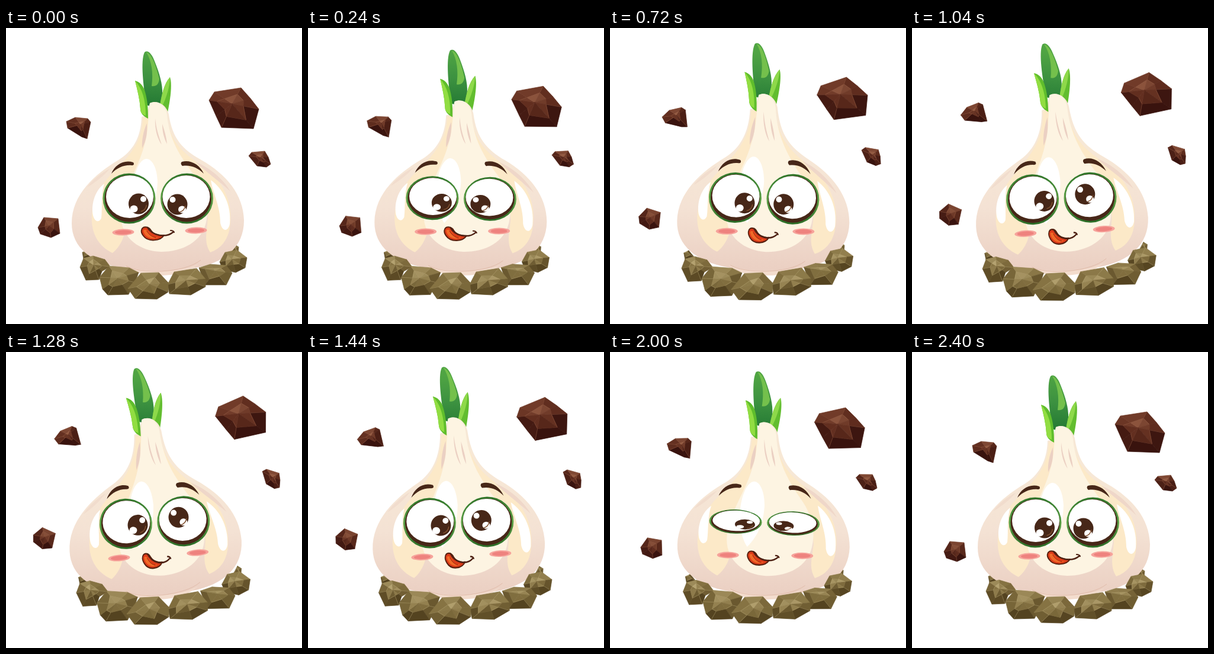
These frames come from a looping animation (500 by 500 pixels, 2480 ms). An HTML page with a canvas:

```html
<!DOCTYPE html>
<html lang="en">
<head>
<meta charset="utf-8">
<title>Garlic</title>
<style>
  html, body { margin: 0; width: 100%; height: 100%; overflow: hidden; background: #fff; }
  canvas { display: block; width: 500px; height: 500px; }
</style>
</head>
<body>
<canvas id="stage" width="500" height="500"></canvas>
<script>
const ctx = document.getElementById('stage').getContext('2d');
const STEP = 80, STEPS = 31, HALF = 15;
const BROWN = '#472718', PINK = '#ebd0c3';
const PIVOT = [257, 412];
const EARTH = [[84, 67, 32], [132, 113, 65], [180, 162, 112]];
const CLAY = [[57, 19, 14], [98, 46, 31], [148, 91, 66]];

const clamp = v => Math.max(0, Math.min(1, v));
const ease = (u, a, b) => (1 - Math.cos(Math.PI * clamp((u - a) / (b - a)))) / 2;
const rad = deg => deg * Math.PI / 180;

let pose;

function poseAt(u) {
  return {
    drift: ease(u, 0, HALF),
    angle: rad(2.35 * ease(u, 0, 7) - 5.15 * ease(u, 7, 15)),
    rise: 15 * ease(u, 0, 11) - 1.5 * ease(u, 11, 15),
    lid: 1 - 0.52 * (ease(u, 2, 5) - ease(u, 5, 8)),
    gaze: ease(u, 8, 14)
  };
}

// Stretch the neck upwards, then tilt about the root.
function bend(x, y) {
  const w = clamp((300 - y) / 160) ** 2;
  const dx = x - PIVOT[0], dy = y - pose.rise * w - PIVOT[1];
  const c = Math.cos(pose.angle), s = Math.sin(pose.angle);
  return [PIVOT[0] + dx * c - dy * s, PIVOT[1] + dx * s + dy * c];
}

function trace(d, map) {
  ctx.beginPath();
  for (const [, cmd, rest] of d.matchAll(/([MLCZ])([^MLCZ]*)/g)) {
    const n = (rest.match(/-?[\d.]+/g) || []).map(Number);
    const p = [];
    for (let i = 0; i < n.length; i += 2) p.push(...(map ? map(n[i], n[i + 1]) : [n[i], n[i + 1]]));
    if (cmd === 'M') ctx.moveTo(...p);
    else if (cmd === 'Z') ctx.closePath();
    else if (cmd === 'L') ctx.lineTo(...p);
    else for (let i = 0; i < p.length; i += 6) ctx.bezierCurveTo(...p.slice(i, i + 6));
  }
}

function shape(d, fill, map = bend) {
  trace(d, map);
  ctx.fillStyle = fill;
  ctx.fill();
}

function line(d, color, width, map = bend) {
  trace(d, map);
  ctx.strokeStyle = color;
  ctx.lineWidth = width;
  ctx.stroke();
}

function oval(x, y, rx, ry, fill) {
  ctx.beginPath();
  ctx.ellipse(x, y, rx, ry, 0, 0, 7);
  ctx.fillStyle = fill;
  ctx.fill();
}

function fade(y0, y1, ...colors) {
  const g = ctx.createLinearGradient(0, y0, 0, y1);
  colors.forEach((c, i) => g.addColorStop(i / (colors.length - 1), c));
  return g;
}

// Draw in a frame fixed to a point of the face.
function pinned(x, y, sx, sy, draw) {
  ctx.save();
  ctx.translate(...bend(x, y));
  ctx.rotate(pose.angle);
  ctx.scale(sx, sy);
  draw();
  ctx.restore();
}

function tone(pal, v) {
  const k = clamp(v) * 2, i = k < 1 ? 0 : 1;
  return `rgb(${pal[i].map((c, j) => Math.round(c + (pal[i + 1][j] - c) * (k - i)))})`;
}

// A faceted stone: a light front face ringed by facets shaded by direction.
function rock(pts, [cx, cy], pal, size, spin) {
  const inner = pts.map(([x, y], i) => {
    const k = size + 0.13 * Math.sin(i * 2.3 + spin);
    return [cx + (x - cx) * k, cy + (y - cy) * k];
  });
  const face = (list, v) => {
    ctx.beginPath();
    list.forEach(p => ctx.lineTo(...p));
    ctx.closePath();
    ctx.fillStyle = ctx.strokeStyle = tone(pal, v);
    ctx.lineWidth = 0.7;
    ctx.fill();
    ctx.stroke();
  };
  pts.forEach((p, i) => {
    const j = (i + 1) % pts.length, q = pts[j];
    const a = Math.atan2((p[1] + q[1]) / 2 - cy, (p[0] + q[0]) / 2 - cx);
    face([p, q, inner[j], inner[i]], 0.34 - 0.36 * Math.sin(a) + 0.13 * Math.sin(i * 4 + spin));
    face([inner[i], inner[j], [cx, cy]], 0.64 - 0.24 * Math.sin(a) + 0.16 * Math.cos(i * 3 + spin));
  });
  ctx.strokeStyle = tone(pal, 1);
  ctx.globalAlpha = 0.55;
  ctx.lineWidth = 0.8;
  ctx.beginPath();
  inner.forEach((p, i) => {
    if (i % 2) return;
    ctx.moveTo(...pts[i]);
    ctx.lineTo(...p);
    ctx.lineTo(...inner[(i + 1) % inner.length]);
  });
  ctx.stroke();
  ctx.globalAlpha = 1;
}

const floaters = [
  { c: [385, 136], move: [13, -25, -15], heart: [382, 128], size: 0.55,
    pts: [[343, 122], [352, 108], [397, 101], [413, 119], [427, 137], [418, 170], [364, 168], [355, 149]] },
  { c: [122, 168], move: [-18, -22, -28], heart: [126, 163], size: 0.4,
    pts: [[102, 158], [117, 151], [138, 153], [143, 159], [137, 187], [128, 184], [104, 169]] },
  { c: [429, 221], move: [20, -7.5, 23], heart: [430, 219], size: 0.45,
    pts: [[410, 216], [415, 210], [437, 208], [443, 218], [447, 230], [440, 235], [424, 233]] },
  { c: [72, 336], move: [-8.5, -22, 20], heart: [73, 334], size: 0.5,
    pts: [[54, 337], [64, 320], [88, 322], [91, 347], [76, 354], [58, 348]] }
];

const backStones = [
  [[378, 382], [387, 366], [393, 370], [392, 382]],
  [[129, 379], [137, 375], [146, 386], [131, 390]]
];

const frontStones = [
  [[361, 395], [370, 379], [390, 375], [407, 388], [404, 405], [388, 413], [366, 408]],
  [[326, 405], [345, 399], [372, 401], [382, 414], [372, 434], [336, 434]],
  [[125, 404], [131, 389], [147, 385], [167, 391], [176, 403], [162, 411], [157, 425], [135, 426]],
  [[158, 421], [174, 402], [208, 405], [224, 413], [218, 430], [207, 450], [172, 451], [163, 441]],
  [[273, 433], [284, 412], [322, 406], [337, 424], [337, 437], [312, 451], [276, 449]],
  [[206, 440], [228, 414], [258, 413], [274, 430], [274, 446], [255, 458], [218, 457]]
];

function floating() {
  floaters.forEach((f, i) => {
    const [dx, dy, turn] = f.move.map(v => v * pose.drift);
    ctx.save();
    ctx.translate(f.c[0] + dx, f.c[1] + dy);
    ctx.rotate(rad(turn));
    ctx.translate(-f.c[0], -f.c[1]);
    rock(f.pts, f.heart, CLAY, f.size, i + 2);
    ctx.restore();
  });
}

function ring(stones) {
  const k = 1 + 0.043 * pose.drift;
  ctx.save();
  ctx.translate(266, 410);
  ctx.rotate(rad(-1.2 * pose.drift));
  ctx.scale(k, k);
  ctx.translate(-266, -410);
  stones.forEach((pts, i) => {
    const mid = j => pts.reduce((s, p) => s + p[j], 0) / pts.length;
    rock(pts, [mid(0) - 2, mid(1) - 4], EARTH, 0.5, i * 1.7);
  });
  ctx.restore();
}

function leaves() {
  shape('M237 130 C232 98 227 55 234 41 C240 36 247 45 251 56 C259 76 265 95 264 112 L262 138 Z',
    fade(40, 130, '#4fa443', '#3c9140', '#257a34'));
  shape('M237 41 C246 55 249 76 246 98 C253 99 258 96 259 86 C254 65 246 43 237 41 Z', '#74c04c');
  shape('M277 83 C281 95 278 120 272 147 C266 140 262 135 260 130 C263 113 267 94 277 83 Z', '#62bd2f');
  shape('M277 83 C277 98 271 118 263 134 L260 130 C263 113 267 94 277 83 Z', '#8ed94a');
}

function bulb() {
  shape('M229 150 C228 185 214 208 190 223 C150 247 111 281 111 330 C111 371 145 398 200 406 ' +
    'C235 413 290 413 315 406 C368 398 402 371 402 325 C401 281 372 247 330 223 ' +
    'C298 205 281 187 275 146 C271 129 255 121 243 127 C240 140 236 150 229 150 Z',
    fade(200, 405, '#f7e8d6', '#f4e2d4', PINK));
  shape('M231 152 C230 190 213 210 190 235 C162 260 143 290 145 328 C147 356 163 372 180 380 ' +
    'C193 370 203 350 203 325 C203 270 232 230 243 150 Z', '#fce9c8');
  shape('M270 145 C277 192 297 210 332 233 C366 258 385 292 378 338 C374 360 362 373 345 379 ' +
    'C334 362 339 345 341 322 C340 268 282 232 262 145 Z', '#fce9c8');
  shape('M243 127 C256 121 270 130 272 147 C276 190 294 215 313 242 C338 272 344 302 338 328 ' +
    'C331 361 298 378 262 378 C226 377 195 355 194 318 C194 270 234 228 239 170 Z', '#fdf4e2');
  shape('M237 221 C247 221 255 236 256 259 C255 288 248 309 229 330 C215 310 212 276 217 253 C221 234 228 222 237 221 Z', '#fff');
  shape('M166 263 C152 273 143 295 147 317 C150 327 157 330 161 321 C163 305 160 281 166 263 Z', '#fff');
  shape('M346 257 C366 271 381 298 378 331 C375 345 365 344 362 329 C362 301 350 281 346 257 Z', '#fff');
  shape('M320 226 C344 236 366 254 379 276 C362 260 340 245 320 226 Z', '#efd7c9');
  shape('M176 237 C158 247 146 257 137 269 C149 262 164 251 176 237 Z', '#f1dccd');
  shape('M238 161 C239 177 237 190 230 203 C229 190 232 174 238 161 Z', PINK);
  shape('M252 153 C254 170 257 180 263 197 C256 188 251 171 252 153 Z', PINK);
  shape('M264 162 C268 175 271 184 272 196 C267 186 264 176 264 162 Z', PINK);
  shape('M200 402 C225 413 292 415 325 399 C309 411 292 418 257 418 C225 417 211 411 200 402 Z', '#f3dccd');
  line('M203 402 C226 416 300 415 329 392', '#dfb9a8', 0.9);
  shape('M218 89 C226 91 232 97 235 108 C239 122 240 135 240 153 C232 149 227 144 227 137 C226 121 222 105 218 89 Z', '#5fbd2c');
  shape('M218 89 C230 102 236 121 236 148 C230 146 227 142 227 137 C226 121 222 105 218 89 Z', '#91dd42');
}

function eye(x, side) {
  const gx = side > 0 ? 16 + 4 * pose.gaze : -16 + 8 * pose.gaze;
  const gy = side > 0 ? 9 - 6 * pose.gaze : 10 - 17 * pose.gaze;
  pinned(x, 288, 1, pose.lid, () => {
    oval(0, 0, 44.5, 42.5, fade(-42, 42, '#2f7629', '#5ba046', '#2b6d27'));
    oval(0, 0, 41.5, 39.5, BROWN);
    oval(side, -3, 40, 36, '#fff');
    oval(gx, gy, 17, 17.5, BROWN);
    oval(gx + side * 8, gy - 8, 5, 5, '#fff');
    oval(gx - side * 8, gy + 8.5, 6.5, 6, '#fff');
    ctx.beginPath();
    ctx.arc(gx, gy, 13.5, 0.15, 1.3);
    ctx.strokeStyle = '#80502f';
    ctx.lineWidth = 1.5;
    ctx.stroke();
  });
}

function face() {
  shape('M178 246 C184 231 199 222 215 227 C217 230 216 232 212 232 C199 231 188 236 178 246 Z', BROWN);
  shape('M297 226 C311 222 327 230 334 246 C324 236 312 231 298 233 C295 230 295 228 297 226 Z', BROWN);
  eye(208, 1);
  eye(305.5, -1);
  [[198, 345, -4], [321, 342, 6]].forEach(([x, y, out]) =>
    pinned(x + out * pose.drift, y, 1, 1, () => {
      ctx.rotate(rad(-1.4));
      oval(0, 0, 18.5, 5.5, '#f6a39b');
      oval(0, 0, 14, 3.6, '#ee827e');
    }));
  const k = pose.drift;
  pinned(256 + k, 347 + 5 * k, 1 - 0.14 * k, 1 + 0.14 * k, () => {
    ctx.lineJoin = ctx.lineCap = 'round';
    const tongue = 'M-27 -6 C-25 -13 -15 -12 -11 -5 C-7 1 2 4 11 3 C5 13 -16 15 -24 4 C-27 0 -28 -3 -27 -6 Z';
    shape(tongue, '#dc3b18', null);
    shape('M-24 -5 C-21 -8 -16 -5 -13 0 C-9 5 -4 7 2 6 C-4 11 -22 9 -24 -5 Z', '#f06a28', null);
    line(tongue, '#57200f', 2, null);
    line('M-18 -4 C-14 2 -9 6 -3 7', '#ab2810', 1.3, null);
    line('M-17 -10 C-9 4 14 8 26 -2', '#4d2114', 2.4, null);
    line('M22 -5 C25 -5 27 -4 28 -2', '#4d2114', 2.2, null);
  });
}

function render(now) {
  const i = Math.floor((now % (STEP * STEPS)) / STEP);
  pose = poseAt(Math.min(i, 2 * HALF - i));
  ctx.clearRect(0, 0, 500, 500);
  floating();
  ring(backStones);
  leaves();
  bulb();
  face();
  ring(frontStones);
}

const start = performance.now();
function tick() {
  render(performance.now() - start);
  requestAnimationFrame(tick);
}
tick();
</script>
</body>
</html>
```
